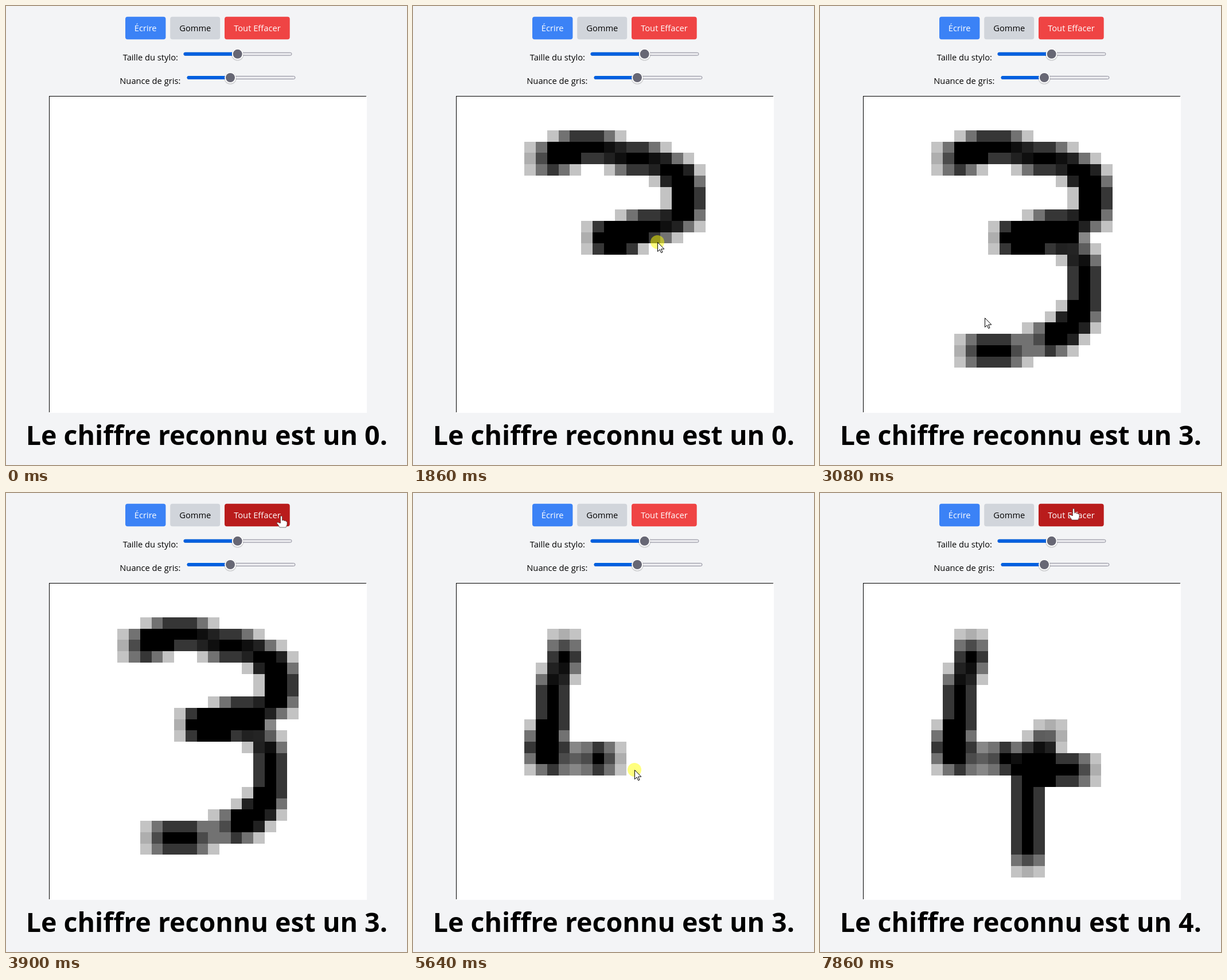
Animation of 699 by 801 pixels, one loop 8 s. Source, as an HTML page:

```html
<!DOCTYPE html>
<html lang="fr">
<head>
<meta charset="utf-8">
<title>Reconnaissance de chiffres</title>
<style>
  html, body { margin: 0; width: 100%; height: 100%; overflow: hidden; background: #f3f4f6; }
  svg { display: block; width: 699px; height: 801px; }
  text { font: 14.7px "Open Sans", "Noto Sans", sans-serif; font-variant-ligatures: none; }
  .mid { text-anchor: middle; }
  #result { font-size: 46.5px; font-weight: 700; }
</style>
</head>
<body>
<svg viewBox="0 0 699 801">
  <rect width="699" height="801" fill="#f3f4f6"/>
  <rect x="208" y="18.75" width="70.4" height="39.5" rx="4" fill="#3b82f6"/>
  <rect x="286.2" y="18.75" width="87" height="39.5" rx="4" fill="#d1d5db"/>
  <rect id="clear" x="381" y="18.75" width="113.7" height="39.5" rx="4" fill="#ef4444"/>
  <text class="mid" x="243.2" y="44" fill="#fff">Écrire</text>
  <text class="mid" x="329.8" y="44">Gomme</text>
  <text class="mid" x="437.9" y="44" fill="#fff">Tout Effacer</text>
  <text x="203.7" y="95">Taille du stylo:</text>
  <text x="198.3" y="135.7">Nuance de gris:</text>
  <g id="sliders"></g>
  <path d="M75 157H628V158H629V710H75Z" fill="#fff"/>
  <path d="M75 157H628V158H76V709H75Z"/>
  <g id="ink" shape-rendering="crispEdges"></g>
  <text id="result" class="mid" x="349.8" y="766"></text>
  <g id="cursor">
    <circle id="press" r="12" fill="#ff0" opacity=".5"/>
    <path id="arrow" d="M.5 .5V16.5L4.2 13 6.6 18.6 9 17.6 6.6 12.1H11.8Z" fill="#fff" stroke="#000"/>
    <path id="hand" d="M-1.5 1Q0-1 1.5 1V8Q3.5 6.5 5 8.5 7 7.5 8 9.5 10 9 10 11.5V15Q9 18 8 20H-3Q-5 16-8 12.5-7 10-3 12.5H-1.5Z"
      fill="#fff" stroke="#222" stroke-width=".6"/>
  </g>
</svg>
<script>
const LOOP = 8000, TICK = 70, CLEARED = 3970;
const GRID = 28, CELL = 19.73, LEFT = 76.05, TOP = 157.8;
const $ = id => document.getElementById(id);
const clamp = v => Math.min(1, Math.max(0, v));
const smooth = u => u * u * (3 - 2 * u);
const mix = (a, b, f) => a.map((v, i) => v + (b[i] - v) * f);

function add(parent, tag, attrs) {
  const node = document.createElementNS('http://www.w3.org/2000/svg', tag);
  for (const key in attrs) node.setAttribute(key, attrs[key]);
  return parent.appendChild(node);
}

function slider(x, y, thumb) {
  const box = $('sliders');
  add(box, 'rect', { x: x + .5, y: y - 2.5, width: 188, height: 5, rx: 2.5, fill: '#e9e9ed', stroke: '#8f8f9d' });
  add(box, 'rect', { x, y: y - 3, width: thumb - x, height: 6, rx: 3, fill: '#0060df' });
  add(box, 'circle', { cx: thumb, cy: y + 1, r: 10.8, fill: '#000', opacity: .14 });
  add(box, 'circle', { cx: thumb, cy: y, r: 10, fill: '#fff' });
  add(box, 'circle', { cx: thumb, cy: y, r: 8, fill: '#676774' });
}
slider(309.5, 83.8, 403.7);
slider(315.5, 125, 391);

// Cells met by sampling each line about once per cell length
function cellsAlong(points) {
  const cells = [points[0].map(Math.round)];
  points.slice(1).forEach((b, i) => {
    const a = points[i], n = Math.round(Math.hypot(b[0] - a[0], b[1] - a[1]));
    for (let k = 1; k <= n; k++) {
      const cell = mix(a, b, k / n).map(Math.round);
      if (cell.join() !== cells[cells.length - 1].join()) cells.push(cell);
    }
  });
  return cells;
}

const hop = (from, to, x, y) => ({ from, to, target: [x, y] });
const pen = (from, to, runs, down = from) => ({ from, to, down, cells: runs.flatMap(cellsAlong) });

// The pointer hops between places or draws; each stage starts where the last one ended
const stages = [
  hop(0, 0, 292, 290),
  hop(70, 280, 225, 263),
  pen(880, 1650, [[[7, 5], [9, 5], [9, 3.9], [17, 5], [20, 7], [20, 10], [18, 10.9], [12, 12]]], 630),
  pen(1790, 2490, [[[13, 12], [17, 12], [19, 14], [19.1, 18.5], [16.6, 21], [15, 21]], [[13, 22], [9, 22]]]),
  hop(2560, 2680, 264, 596),
  hop(3010, 3360, 488, 100),
  hop(3360, 3500, 480, 40),
  hop(3900, 4260, 455, 70),
  hop(4260, 4600, 270, 263),
  pen(4820, 5450, [[[9.3, 5], [8.4, 8], [8, 13], [7, 13], [7, 15]]], 4750),
  pen(5500, 5830, [[[8, 15], [9, 15]], [[11, 15], [13, 15.45], [19, 16]]]),
  hop(6190, 6400, 400, 421),
  pen(6540, 6960, [[[15.7, 13], [14.51, 16], [14, 24]]], 6470),
  hop(7090, 7860, 442, 27)
];
const strokes = stages.filter(s => s.cells);
const presses = [[630, 2550], [4750, 6190], [6470, 7090]];

const progress = (s, t) => clamp((t - s.from) / (s.to - s.from || 1));
const reach = (s, t) => (s.cells.length - 1) * progress(s, t);

function laid(s, t) {
  const wiped = s.down < CLEARED && t >= CLEARED;
  return t < s.down || wiped ? 0 : 1 + Math.floor(reach(s, t) + 1e-6);
}

function pointer(i, t) {
  const s = stages[i];
  if (s.target) return i ? mix(pointer(i - 1, s.from), s.target, smooth(progress(s, t))) : s.target;
  // the drawn trail lags one tick behind the pointer
  const n = reach(s, t + TICK), k = Math.floor(n);
  const [c, r] = mix(s.cells[k], s.cells[k + 1] || s.cells[k], n - k);
  return [LEFT + CELL * (c + .35), TOP + CELL * (r + .5)];
}

const edge = (origin, n) => Math.round(origin + CELL * n);
const pixels = Array.from({ length: GRID * GRID }, (_, i) => {
  const c = i % GRID, r = (i - c) / GRID, x = edge(LEFT, c), y = edge(TOP, r);
  return add($('ink'), 'rect', { x, y, width: edge(LEFT, c + 1) - x, height: edge(TOP, r + 1) - y, fill: 'none' });
});

// Every stamp darkens its cell, the sides and the corners by fixed amounts
let inked = '';
function paint(counts) {
  if (inked === counts.join()) return;
  inked = counts.join();
  const ink = new Array(pixels.length).fill(0);
  strokes.forEach((s, k) => s.cells.slice(0, counts[k]).forEach(([c, r]) => {
    for (let dy = -1; dy <= 1; dy++)
      for (let dx = -1; dx <= 1; dx++)
        ink[(r + dy) * GRID + c + dx] += [99, 81, 60][Math.abs(dx) + Math.abs(dy)];
  }));
  pixels.forEach((p, i) => {
    const v = Math.max(0, 255 - ink[i]);
    p.setAttribute('fill', ink[i] ? `rgb(${v},${v},${v})` : 'none');
  });
}

const show = (id, on) => { $(id).style.display = on ? '' : 'none'; };

function frame() {
  const now = performance.now() % LOOP;
  const i = stages.filter(s => s.from <= now).length - 1;
  const start = stages[i].from;
  const t = start + TICK * Math.floor((now - start) / TICK);

  paint(strokes.map(s => laid(s, now < s.from ? now : t)));
  const digit = now < 2680 ? 0 : now < 6330 ? 3 : 4;
  const line = `Le chiffre reconnu est un ${digit}.`;
  if ($('result').textContent !== line) $('result').textContent = line;

  const [x, y] = pointer(i, t);
  const hover = x > 381 && x < 495 && y > 19 && y < 58;
  $('cursor').setAttribute('transform', `translate(${Math.round(x)} ${Math.round(y)})`);
  show('cursor', now >= TICK);
  show('press', presses.some(([a, b]) => now >= a && now < b));
  show('arrow', !hover);
  show('hand', hover);
  $('clear').setAttribute('fill', hover ? '#b91c1c' : '#ef4444');
  requestAnimationFrame(frame);
}
frame();
</script>
</body>
</html>
```
